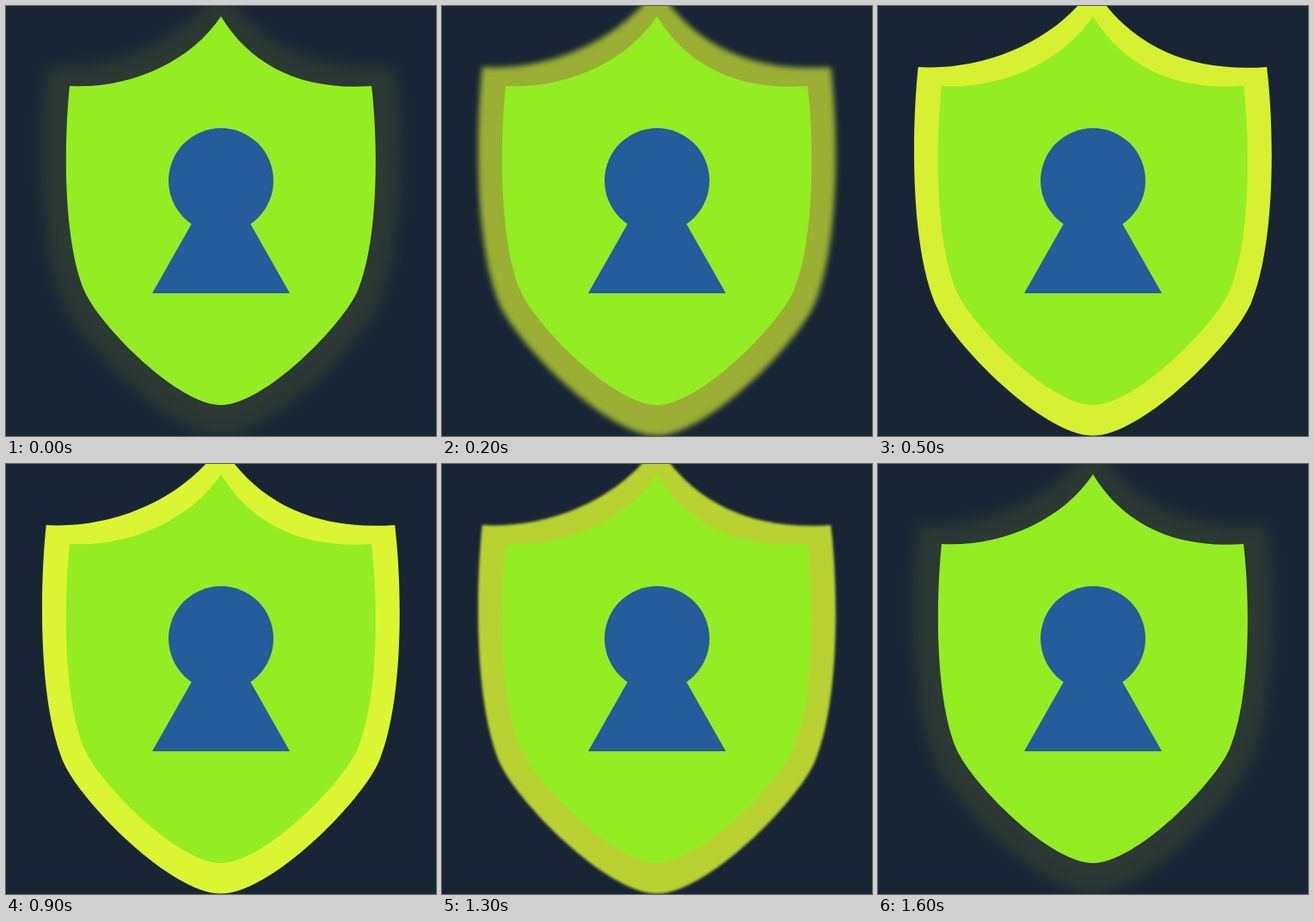
Write an HTML page that moves like this. It is 500 by 500 pixels and loops after 1.7 s.

```html
<!DOCTYPE html>
<html lang="en">
<head>
<meta charset="utf-8">
<title>Glowing shield</title>
<style>
  html, body { margin: 0; width: 100%; height: 100%; overflow: hidden; background: #192535; }
  svg { display: block; width: 100vw; height: 100vh; }
</style>
</head>
<body>
<svg viewBox="0 0 500 500">
  <defs>
    <path id="shield" d="M250 12C214 66 142 97 74 93C68 150 65 268 91 331C109 372 200 464 250 464
      C300 464 391 372 409 331C435 268 432 150 425 93C342 99 284 68 250 12Z"/>
  </defs>
  <g id="glow">
    <use href="#shield" fill="#dcf532" transform="translate(250 235) scale(1.155) translate(-250 -235)"/>
  </g>
  <use href="#shield" fill="#94ec23"/>
  <g fill="#245c9c">
    <circle cx="250" cy="203" r="61"/>
    <path d="M216 253L170 334H330L284 253Z"/>
  </g>
</svg>
<script>
const LOOP = 1700, STEP = 100, RISE = 700, MAX_BLUR = 10;
const glow = document.getElementById('glow');

const bezier = (a, b, s) => 3 * a * s * (1 - s) ** 2 + 3 * b * s * s * (1 - s) + s ** 3;

// Same curve as the CSS "ease" keyword
function ease(x) {
  let lo = 0, hi = 1;
  for (let i = 0; i < 24; i++) {
    const mid = (lo + hi) / 2;
    if (bezier(0.25, 0.25, mid) < x) lo = mid; else hi = mid;
  }
  return bezier(0.1, 1, lo);
}

function draw() {
  const time = Math.floor(performance.now() % LOOP / STEP) * STEP;
  const sinceTurn = Math.min(time, LOOP - STEP - time);
  const level = ease(Math.min(1, 0.1 + sinceTurn / RISE));
  const blur = MAX_BLUR * (1 - level);
  glow.style.opacity = level;
  glow.style.filter = blur > 0.01 ? `blur(${blur}px)` : 'none';
  requestAnimationFrame(draw);
}
draw();
</script>
</body>
</html>
```
